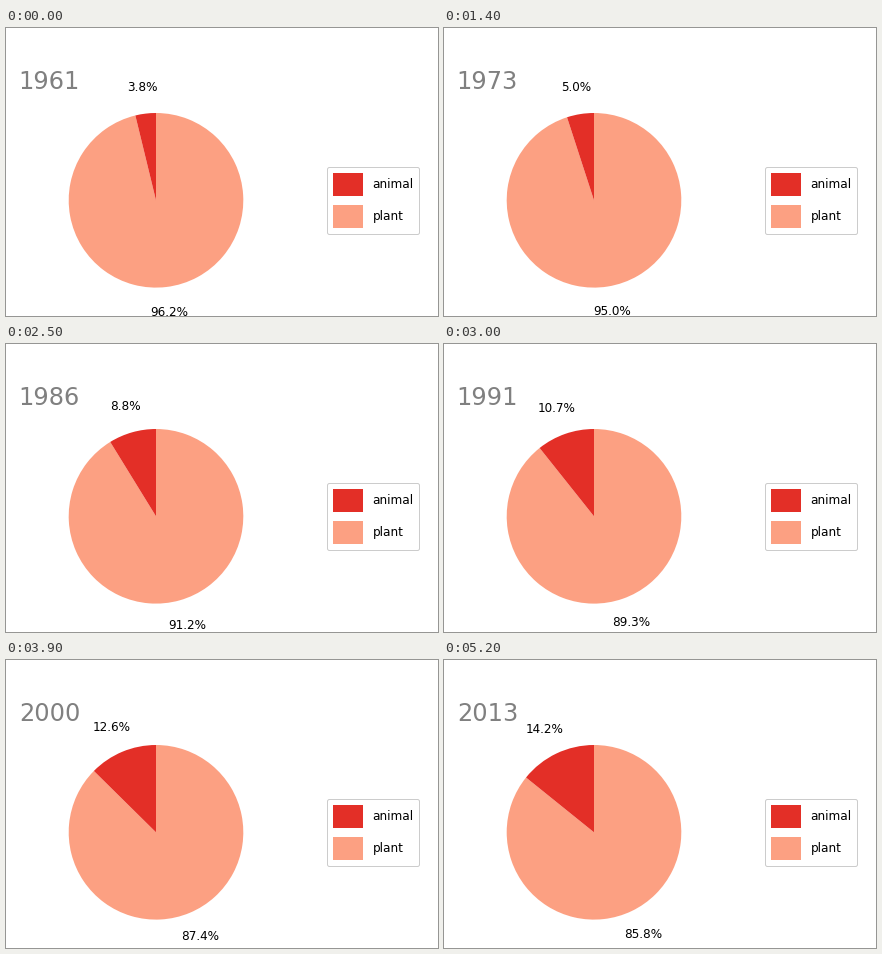
Recreate the animation shown at these times as a matplotlib script. Size 432 by 288 pixels, loop 5.3 s.

```python
import math

import matplotlib.pyplot as plt
import numpy as np
from matplotlib.animation import FuncAnimation
from matplotlib.patches import FancyBboxPatch, Rectangle, Wedge

plt.rcParams["font.family"] = "DejaVu Sans"

W, H, DPI = 432, 288, 72
RED = (227 / 255, 47 / 255, 39 / 255)
SALMON = (252 / 255, 160 / 255, 130 / 255)
CX, CY, R = 150.0, 172.3, 87.3
LABEL_R = 1.3 * R

# Years are ordered by animal share, so the early ones are not chronological.
YEARS = [1961, 1962, 1963, 1964, 1969, 1968, 1967, 1965, 1970, 1971,
         1972, 1975, 1974, 1966, 1973, *range(1976, 2014)]

# Animal share in percent at a few steps, linear in between.
STEPS = [0, 3, 7, 14, 18, 20, 24, 30, 36, 39, 42, 48, 52]
SHARES = [3.8, 4.5, 4.97, 5.0, 5.8, 6.2, 8.4, 10.7, 12.2, 12.6, 13.0, 13.9, 14.2]

fig = plt.figure(figsize=(W / DPI, H / DPI), dpi=DPI, facecolor="white")
ax = fig.add_axes([0, 0, 1, 1])
ax.set_xlim(0, W)
ax.set_ylim(H, 0)
ax.axis("off")


def add_wedge(color):
    return ax.add_patch(Wedge((CX, CY), R, -90, 270, facecolor=color, linewidth=0))


def add_text(x, y, text="", **style):
    style = {"fontsize": 12, "color": "black", "va": "baseline", **style}
    return ax.text(x, y, text, **style)


def add_legend():
    ax.add_patch(FancyBboxPatch((323.4, 141.4), 87.2, 62.2,
                                boxstyle="round,pad=2.4,rounding_size=2.4",
                                facecolor="white", edgecolor="#cccccc",
                                linewidth=1, snap=True))
    for top, color, name in [(145, RED, "animal"), (177, SALMON, "plant")]:
        ax.add_patch(Rectangle((327, top), 30, 23, facecolor=color, linewidth=0))
        add_text(366.5, top + 15, name)


def place_label(label, share, angle):
    """Put a percentage outside the pie; angle runs counter-clockwise from the top."""
    label.set_text(f"{share:.1f}%")
    label.set_position((CX - LABEL_R * math.sin(angle) - 0.1,
                        CY - LABEL_R * math.cos(angle) + 3.05))


plant = add_wedge(SALMON)
animal = add_wedge(RED)
animal_label = add_text(0, 0, ha="center")
plant_label = add_text(0, 0, ha="center")
year_text = add_text(12, 61, fontsize=24, color="0.5")
add_legend()


def draw(i):
    share = float(np.interp(i, STEPS, SHARES))
    sweep = 3.6 * share
    animal.set_theta1(-90 - sweep)
    animal.set_theta2(-90)
    plant.set_theta1(-90)
    plant.set_theta2(270 - sweep)

    middle = math.radians(sweep / 2)
    place_label(animal_label, share, middle)
    place_label(plant_label, 100 - share, middle + math.pi)

    year = YEARS[i]
    year_text.set_text(str(year))
    year_text.set_x(12 if year < 2000 else 13)
    return animal, plant, animal_label, plant_label, year_text


anim = FuncAnimation(fig, draw, frames=len(YEARS), interval=100,
                     repeat=True, repeat_delay=0, blit=False)
plt.show()
```
